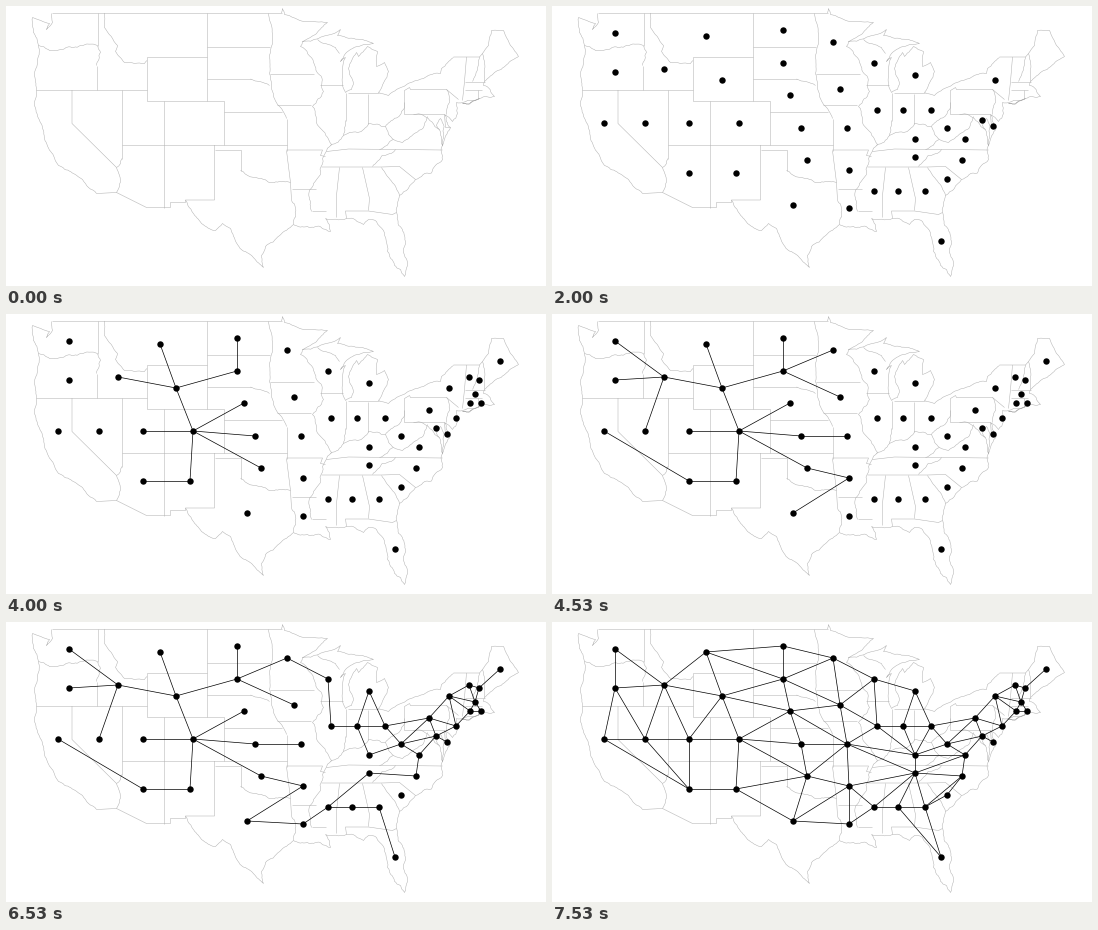
These frames come from a looping animation (540x280 px, 8 s). A matplotlib script:

```python
import numpy as np
import matplotlib.pyplot as plt
from matplotlib.animation import FuncAnimation
from matplotlib.collections import LineCollection

W, H, DPI = 540, 280, 100
PX = 72 / DPI
FRAMES, INTERVAL = 200, 40

rng = np.random.default_rng(7)
outline = []


def line(*pts):
    outline.append(np.array(pts, float))


def wiggle(a, b, amp):
    """Midpoint displacement from a to b, without b."""
    d = b - a
    size = np.hypot(*d)
    if size < 3:
        return [a]
    mid = (a + b) / 2 + np.array([-d[1], d[0]]) * rng.uniform(-amp, amp)
    return wiggle(a, mid, amp) + wiggle(mid, b, amp)


def rough(*pts, amp=0.13):
    """Coast or river through a few key points."""
    p = np.array(pts, float)
    out = [q for a, b in zip(p, p[1:]) for q in wiggle(a, b, amp)]
    outline.append(np.array(out + [p[-1]]))


def across(y, x0, x1):
    line((x0, y), (x1, y))


def down(x, y0, y1):
    line((x, y0), (x, y1))


# Pacific and Mexican edge
rough((46, 8), (47, 17), (41, 24), (44, 18), (27, 12), (33, 40), (29, 68),
      (29, 100), (38, 125), (48, 150), (53, 160), (77, 174), (83, 182),
      (91, 188), amp=0.08)
line((91, 188), (111, 187), (141, 202), (165, 202), (165, 197), (180, 197),
     (180, 194.5), (209, 194.5), (209, 139.5))
rough((180, 194.5), (196, 218), (210, 225), (217, 218), (225, 223), (237, 245),
      (258, 262), (256, 250), (260, 241), (288, 219), amp=0.08)
# Gulf and Atlantic
rough((288, 219), (302, 221), (325, 226), (320, 213), (341, 213), (358, 219),
      (363, 214), (371, 216), (378, 225), (382, 246), (399, 271), (402, 260),
      (391, 206), (394, 190), (410, 174), (437, 154), (437, 140), (431, 120),
      (435, 113), (438, 130), (437, 140), (445, 122), (439, 109), (447, 116),
      (452, 108), (451, 97), (474, 93), (489, 91), (478, 80), (479, 76))
rough((457, 98), (474, 93), (463, 99), (457, 98))
rough((479, 76), (489, 67), (513, 51), (505, 40), (498, 25), (486, 25),
      (483, 40), (477, 48), (479, 76), amp=0.08)
# Northern edge and lakes
across(7.5, 46, 276)
rough((276, 7.5), (277, 3), (279, 9), (299, 16), (322, 17), (297, 36),
      (313, 33), (335, 24), (332, 30), (368, 38), (352, 41), (340, 48),
      (335, 56), (340, 52), (337, 79), (340, 87), amp=0.08)
rough((340, 87), (346, 84), (348, 78), (343, 63), (351, 47), (353, 51),
      (362, 41), (372, 46), (371, 61), (379, 57), (383, 66), (373, 87),
      (383, 90), (411, 75), (435, 68), (436, 63), (448, 52), amp=0.08)
rough((312, 34), (330, 42), (334, 48))
line((448, 51.5), (474, 51.5), (477, 48))
# West
rough((33, 40), (44, 45), (68, 42), (75, 40), (92, 40))
down(92, 7.5, 40)
rough((92, 40), (95, 47), (91, 60))
down(91, 60, 84.5)
across(84.5, 30, 141.5)
line((66.5, 84.5), (66.5, 118), (111, 162))
down(116.5, 84.5, 153)
rough((116.5, 153), (111, 162), (114, 170), (111, 187))
rough((99, 7.5), (99, 22), (112, 40), (110, 46), (119, 57), (139, 58),
      (141.5, 55), amp=0.06)
line((201, 51.5), (141.5, 51.5), (141.5, 95.5), (218, 95.5), (218, 139.5))
across(139.5, 116.5, 281)
down(158.5, 95.5, 202)
line((209, 144.5), (235, 144.5), (235, 165))
rough((235, 165), (256, 173), (285, 177))
# Plains
down(201, 7.5, 95.5)
across(41.5, 201, 264)
across(73.5, 201, 245)
rough((245, 73.5), (264, 80))
across(106.5, 218, 276)
rough((263, 8), (267, 38), (264, 50), (264, 68), (272, 99), (281, 113),
      amp=0.06)
across(68.5, 264, 308)
across(99.5, 271, 305)
down(281, 113, 145)
line((281, 144.5), (317, 144.5), (315, 150), (320, 151))
line((281, 145), (285, 177), (286, 195))
across(183.5, 286, 310)
rough((286, 195), (290, 203), (288, 219))
# Mississippi and Ohio
rough((297, 36), (295, 41), (308, 57), (318, 86), (307, 101), (326, 139),
      (308, 178), (306, 206))
across(205.5, 306, 320)
rough((325, 140), (338, 130), (352, 127), (363, 118), (380, 121), (398, 104),
      (399, 97))
across(79.5, 314, 337)
down(340, 87, 115)
rough((340, 115), (338, 130))
across(87.5, 342, 373)
down(362.5, 88, 118)
# South
line((334, 162), (331, 190), (331, 212))
line((357, 162), (364, 193), (363, 205))
line((341, 213), (340, 205.5), (363, 205.5), (387, 209), (391, 207))
line((316, 161.5), (376, 161.5), (394, 161), (410, 174))
line((321, 146), (343, 143.5), (437, 144.5))
rough((390, 144), (367, 161))
rough((376, 162), (394, 190), amp=0.06)
# East
line((439, 109), (399, 109), (399, 85), (404, 82), (405, 84), (441, 84),
     (453, 94))
rough((441, 84), (444, 97), (441, 109))
rough((380, 121), (388, 134), (374, 144))
rough((388, 134), (397, 137), (422, 111))
rough((408, 109), (418, 110), (434, 124))
line((439, 109), (440, 122), (445, 122))
line((461, 51.5), (459, 76), (457, 95))
rough((474, 51.5), (467, 76), amp=0.06)
across(76.5, 459, 479)
across(84.5, 459, 476)
down(472, 84.5, 93)

# One node per state, grouped by the step in which it appears
NODES = [
    dict(CA=(52, 117), MT=(154, 30), MN=(281, 36), MI=(363, 69),
         OH=(379, 104), TN=(363, 151), LA=(297, 202), FL=(389, 235),
         NY=(443, 74), CO=(187, 117)),
    dict(WA=(63, 27), OR=(63, 66), ID=(112, 63), NV=(93, 117), UT=(137, 117),
         AZ=(137, 167), WY=(170, 74), ND=(231, 24), SD=(231, 57),
         NE=(238, 89)),
    dict(NM=(184, 167), KS=(249, 122), OK=(255, 154), TX=(241, 199),
         IA=(288, 83), MO=(295, 122), AR=(297, 164), MS=(322, 185),
         AL=(346, 185), GA=(373, 185)),
    dict(WI=(322, 57), IL=(325, 104), IN=(351, 104), KY=(363, 133),
         WV=(395, 122), VA=(413, 133), NC=(410, 154), SC=(395, 173),
         MD=(430, 114), DE=(441, 120)),
    dict(PA=(423, 96), NJ=(450, 104), CT=(464, 89), RI=(475, 89),
         MA=(469, 80), VT=(463, 63), NH=(473, 66), ME=(494, 47)),
]
# Links added step by step after the nodes
LINKS = [
    "UT-CO",
    "CO-WY CO-NE CO-KS CO-OK CO-NM",
    "WY-ID WY-MT WY-SD SD-ND NM-AZ",
    "AZ-CA ID-WA ID-OR ID-NV SD-MN SD-IA KS-MO OK-AR AR-TX",
    "TX-LA LA-MS MS-AL AL-GA GA-FL MS-TN",
    "MN-WI WI-IL IL-IN IN-OH IN-MI IN-KY KY-WV",
    "TN-NC WV-VA WV-PA VA-MD MD-DE PA-NJ PA-NY NY-VT NY-CT VT-NH NH-ME "
    "NH-MA MA-RI",
    "MI-OH OH-PA OH-WV VA-NC WV-MD MD-PA MD-NJ NJ-NY NJ-CT NY-MA VT-MA "
    "MA-CT CT-RI",
    "NE-KS NE-IA NE-MO KS-OK OK-TX OK-MO IA-WI IA-IL IA-MO MO-IL MO-KY "
    "MO-TN MO-AR AR-TN AR-MS AR-LA WI-MI IL-KY KY-OH KY-TN TN-AL TN-GA "
    "AL-FL GA-SC GA-NC SC-NC",
    "WA-OR OR-CA OR-NV CA-NV NV-UT NV-AZ UT-AZ UT-ID UT-WY ID-MT MT-ND "
    "MT-SD WY-NE SD-NE ND-MN MN-IA NM-OK NM-TX KY-VA TN-VA",
]

pos = {k: p for group in NODES for k, p in group.items()}
dots = [list(group.values()) for group in NODES]
links = [[[pos[s] for s in pair.split("-")] for pair in row.split()]
         for row in LINKS]

fig = plt.figure(figsize=(W / DPI, H / DPI), dpi=DPI, facecolor="white")
ax = fig.add_axes([0, 0, 1, 1])
ax.set(xlim=(0, W), ylim=(H, 0))
ax.axis("off")
ax.add_collection(LineCollection(outline - np.float64(0.5)
                                 if isinstance(outline, np.ndarray)
                                 else [p - 0.5 for p in outline],
                                 colors="#b0b0b0", linewidths=0.5 * PX))
web = LineCollection([], colors="black", linewidths=0.7 * PX, zorder=2)
ax.add_collection(web)
marks, = ax.plot([], [], "o", color="black", ms=6.4 * PX, mew=0, zorder=3,
                 snap=False)


def draw(n):
    # two steps per second, the odd one slightly after the half
    step = 2 * (n // 25) + (n % 25 >= 13)
    shown = sum(dots[:step], [])
    marks.set_data([p[0] for p in shown], [p[1] for p in shown])
    web.set_segments(sum(links[:max(0, step - len(dots))], []))
    return web, marks


anim = FuncAnimation(fig, draw, frames=FRAMES, interval=INTERVAL,
                     repeat=True, repeat_delay=0)
plt.show()
```
